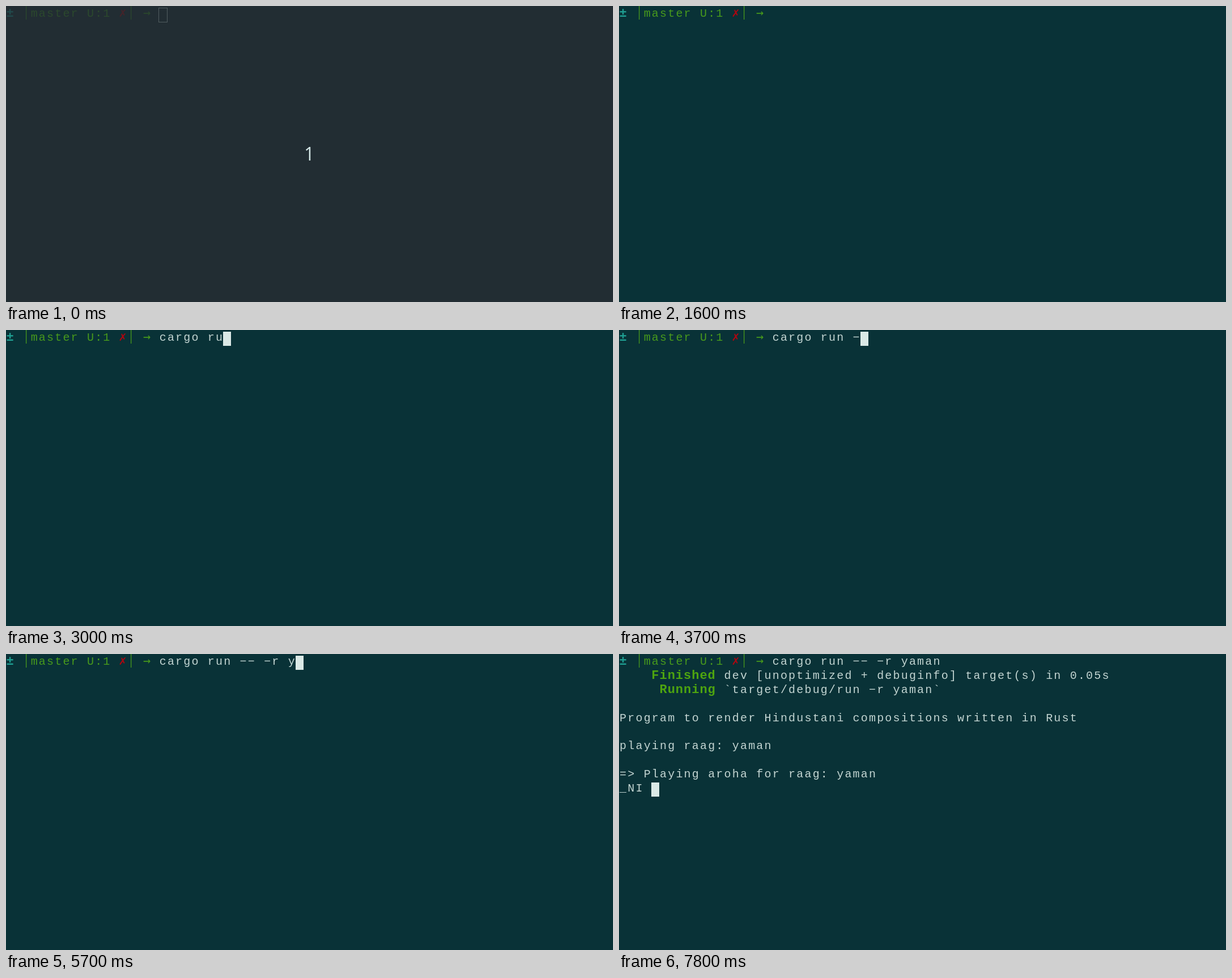
These frames come from a looping animation (1071 by 523 pixels, 8000 ms). An HTML page with a canvas:

```html
<!DOCTYPE html>
<html lang="en">
<head>
<meta charset="utf-8">
<title>Terminal session</title>
<style>
html, body { margin: 0; width: 100%; height: 100%; overflow: hidden; background: #093237; }
canvas { display: block; }
</style>
</head>
<body>
<canvas width="1071" height="523"></canvas>
<script>
const ctx = document.querySelector('canvas').getContext('2d');
const LOOP = 8000, COL = 14.19, ROW = 24.9, BASELINE = 19, PROMPT_COLS = 19;
const GREEN = '#489a1c', LIME = '#4ea50f', TEAL = '#1f9f92', RED = '#b00610', TEXT = '#c3d5d2', BLOCK = '#dbe9e6';
const MONO = '"Liberation Mono", monospace';
const REGULAR = `20px ${MONO}`, BOLD = `bold 22px ${MONO}`, SYMBOL = '22px "DejaVu Sans Mono", monospace';

// [time, command line] for each keystroke
const typed = [
  [0, ''], [1900, 'c'], [2000, 'ca'], [2300, 'car'], [2400, 'carg'], [2500, 'cargo'],
  [2700, 'cargo '], [2800, 'cargo r'], [3000, 'cargo ru'], [3100, 'cargo run'],
  [3300, 'cargo run '], [3700, 'cargo run -'], [3800, 'cargo run --'], [4000, 'cargo run -- -'],
  [4500, 'cargo run -- -f'], [4800, 'cargo run -- -'], [5000, 'cargo run -- -r'],
  [5100, 'cargo run -- -r '], [5700, 'cargo run -- -r y'], [5900, 'cargo run -- -r ya'],
  [6000, 'cargo run -- -r yam'], [6100, 'cargo run -- -r yama'], [6300, 'cargo run -- -r yaman']
];

function print(str, col, row, color = TEXT, font = REGULAR) {
  ctx.font = font;
  ctx.letterSpacing = '0px';
  const gap = COL - ctx.measureText('m').width;
  ctx.letterSpacing = `${gap}px`;
  ctx.fillStyle = color;
  // the wide minus gives the long dashes of a typewriter face
  ctx.fillText(str.replaceAll('-', '−'), col * COL + gap / 2, row * ROW + BASELINE);
}

function bar(col) {
  ctx.fillStyle = GREEN;
  ctx.fillRect(Math.round((col + 0.5) * COL), 0, 1.3, 24);
}

function block(col, row) {
  ctx.fillStyle = BLOCK;
  ctx.fillRect(Math.round(col * COL), Math.round(row * ROW + 3), 14, 25);
}

function outline() {
  ctx.strokeStyle = BLOCK;
  ctx.strokeRect(269.5, 3.5, 15, 25);
}

function prompt() {
  print('±', 0, 0, TEAL, BOLD);
  bar(2);
  print('master U:1', 3, 0, GREEN);
  print('✗', 14, 0, RED, SYMBOL);
  bar(15);
  print('→', 17, 0, GREEN, SYMBOL);
}

function output() {
  print('Finished', 4, 1, LIME, BOLD);
  print('dev [unoptimized + debuginfo] target(s) in 0.05s', 13, 1);
  print('Running', 5, 2, LIME, BOLD);
  print('`target/debug/run -r yaman`', 13, 2);
  print('Program to render Hindustani compositions written in Rust', 0, 4);
  print('playing raag: yaman', 0, 6);
  print('=> Playing aroha for raag: yaman', 0, 8);
  print('_NI', 0, 9);
}

function countdown() {
  ctx.font = '32px "Open Sans", sans-serif';
  ctx.letterSpacing = '0px';
  ctx.fillStyle = '#d3e6e6';
  ctx.fillText('1', 526, 273);
}

function draw(t) {
  const intro = t < 100;
  ctx.fillStyle = intro ? '#222d33' : '#093237';
  ctx.fillRect(0, 0, 1071, 523);
  if (intro) countdown();

  ctx.globalAlpha = intro ? 0.25 : 1;
  prompt();
  const line = typed.findLast(([at]) => at <= t)[1];
  print(line, PROMPT_COLS, 0);

  if (t < 1000) {
    outline();
  } else if (t >= 6700) {
    output();
    if (t < 7200 || t >= 7800) block(4, 9);
  } else if (t < 1600 || t >= 1800) {
    block(PROMPT_COLS + line.length, 0);
  }
  ctx.globalAlpha = 1;
}

function frame(now) {
  draw(now % LOOP);
  requestAnimationFrame(frame);
}
requestAnimationFrame(frame);
</script>
</body>
</html>
```
